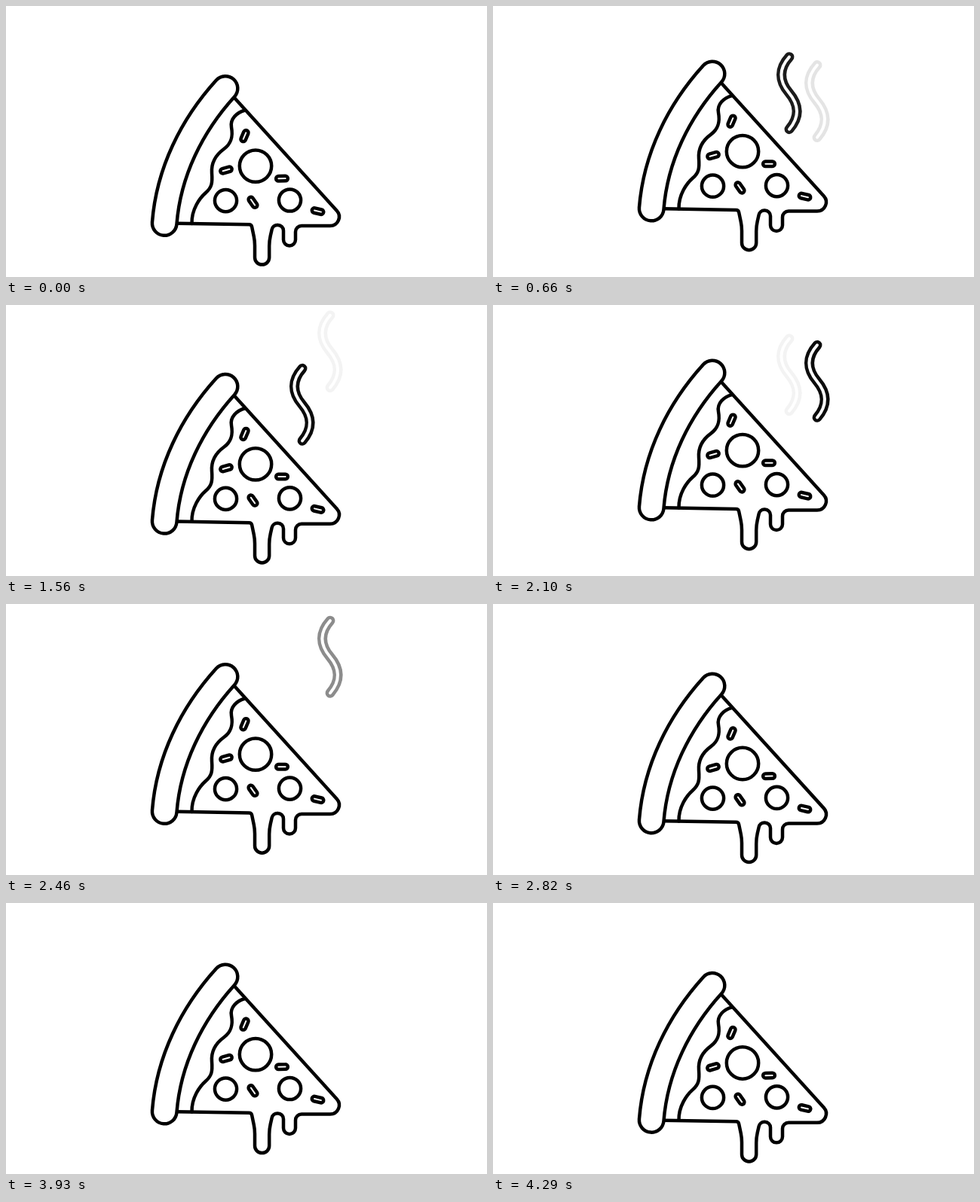
An HTML page with a canvas for the animation above (4.32 s loop, 638 px wide and 360 px high).

```html
<!DOCTYPE html>
<html lang="en">
<head>
<meta charset="utf-8">
<title>Hot pizza slice</title>
<style>
  html, body { margin: 0; width: 100%; height: 100%; overflow: hidden; background: #fff; }
  canvas { display: block; }
</style>
</head>
<body>
<canvas id="stage" width="638" height="360"></canvas>
<script>
const ctx = document.getElementById('stage').getContext('2d');
const STEP = 36, STEPS = 120;       // ms per drawing, drawings per loop
const BOB = 40, PUFF = 30;          // cycle lengths in drawings
const LINE = 4.5;

// Centre lines of the hollow shapes, and the wavy cheese edge.
const crust = new Path2D('M291 109.5 C246.5 158.5 215.5 220.5 210.2 288.5');
const wisp = new Path2D('M393 5.4 C379 21 379 37 392.5 53 S407 85 393 101.5');
const pill = new Path2D('M-4.6 0 H4.6');
const cheese = new Path2D(
  'M317 138.5 C306 141.5 297 150 299 161 S300 182 289 190 ' +
  'S272 209 273 222 S273 241 265 248 S246 270 246.5 289');

// Corners of the slice from tip to crust: x, y, rounding
const corners = [
  [457, 292, 12], [384, 292, 8],
  [384, 318.5, 7.9], [368, 318.5, 7.9],                  // short drip
  [368, 291, 7.4], [354, 291, 7.4], [349.2, 312, 60],
  [349.2, 343.6, 9.5], [330, 343.6, 9.5],                // long drip
  [330, 312, 60], [325.5, 290.4, 4]
];

const smooth = x => x * x * (3 - 2 * x);
const swing = p => smooth(1 - Math.abs(1 - 2 * p));   // 0 to 1 and back

function tube(path, size, alpha = 1) {
  ctx.strokeStyle = `rgba(0,0,0,${alpha})`;
  ctx.lineWidth = size + LINE;
  ctx.stroke(path);
  ctx.strokeStyle = '#fff';
  ctx.lineWidth = size - LINE;
  ctx.stroke(path);
}

function topping(x, y, r) {
  ctx.beginPath();
  ctx.arc(x, y, r, 0, Math.PI * 2);
  ctx.stroke();
}

function sprinkle(x, y, deg) {
  ctx.save();
  ctx.translate(x, y);
  ctx.rotate(deg * Math.PI / 180);
  tube(pill, 6.5);
  ctx.restore();
}

function drawPizza(n) {
  ctx.save();
  ctx.translate(0, -20 * swing(n % BOB / BOB));
  ctx.strokeStyle = '#000';
  ctx.lineWidth = LINE;

  ctx.beginPath();
  ctx.moveTo(303, 122);
  for (const [x, y, r] of corners) ctx.arcTo(x, y, x, y, 0) || 0;
  ctx.beginPath();
  ctx.moveTo(303, 122);
  corners.forEach(([x, y, r], i) => {
    const [nx, ny] = corners[i + 1] || [226, 288.8];
    ctx.arcTo(x, y, nx, ny, r);
  });
  ctx.lineTo(226, 288.8);
  ctx.stroke();
  ctx.stroke(cheese);

  topping(331, 212.6, 21.2);
  topping(291.5, 258.6, 14.6);
  topping(376.5, 258, 14.6);

  sprinkle(316.5, 172.6, -67);
  sprinkle(292, 218, -16);
  sprinkle(366, 229.2, -1);
  sprinkle(327.5, 260.8, 55);
  sprinkle(413.5, 272.6, 13);

  tube(crust, 32.6);
  ctx.restore();
}

// Each wisp rises twice, then rests until the loop restarts.
function drawWisp(n, dx, dy) {
  if (n < 0 || n >= 2 * PUFF) return;
  const p = n % PUFF / PUFF;
  ctx.save();
  ctx.translate(dx, dy + 106 - 67.6 * smooth(p));
  if (p) tube(wisp, 8.4, swing(p));
  ctx.restore();
}

function draw(ms) {
  const n = Math.floor(ms / STEP) % STEPS;
  ctx.fillStyle = '#fff';
  ctx.fillRect(0, 0, 638, 360);
  ctx.lineCap = ctx.lineJoin = 'round';
  drawWisp(n, 0, 0);
  drawWisp(n - PUFF / 2, 37, -31);
  drawPizza(n);
}

const start = performance.now();
function tick() {
  draw(performance.now() - start);
  requestAnimationFrame(tick);
}
tick();
</script>
</body>
</html>
```
